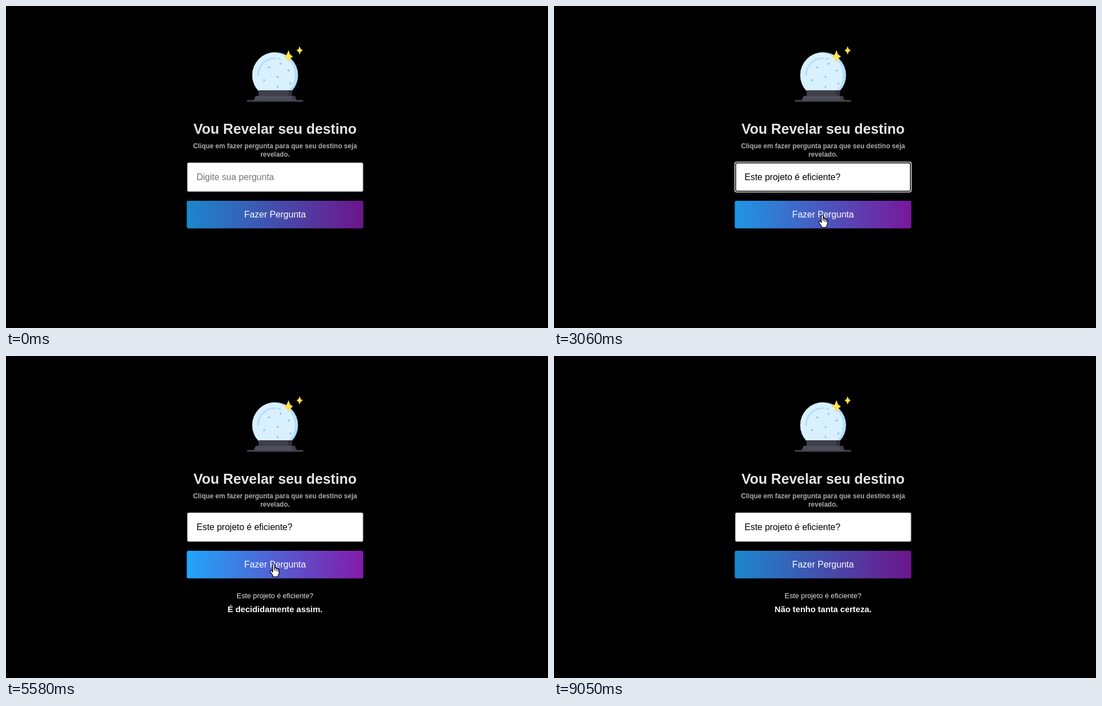
These frames come from a looping animation (970x577 px, 9.98 s). An HTML page with a canvas:

```html
<!DOCTYPE html>
<html lang="pt">
<head>
<meta charset="utf-8">
<title>Vou Revelar seu destino</title>
<style>
html, body { margin: 0; width: 100%; height: 100%; overflow: hidden; background: #000; }
canvas { display: block; }
</style>
</head>
<body>
<canvas id="stage" width="970" height="577"></canvas>
<script>
const ctx = document.getElementById('stage').getContext('2d', { alpha: false });
const LOOP = 9980;
const CENTER = 481.5;
const FONT = '"Liberation Sans", Arial, sans-serif';
const QUESTION = 'Este projeto é eficiente?';
const BUTTON = { x: 323.5, y: 349, w: 316, h: 49.5 };

// Pointer hot spot over time: [ms, x, y]
const PATH = [
  [190, 876, 510], [850, 446, 283], [1020, 445, 293], [1350, 445, 293],
  [1490, 445, 330], [1760, 445, 312], [2710, 445, 312], [3060, 480, 374],
  [3450, 480, 374], [3590, 461, 418], [3660, 472, 436], [3900, 492, 448],
  [4200, 522, 432], [4420, 516, 404], [4560, 492, 394], [4850, 479, 375],
  [5510, 479, 375], [5580, 479, 373], [6310, 479, 373], [6380, 478, 371],
  [7360, 478, 371], [7500, 478, 359], [7640, 478, 371], [8420, 478, 371],
  [8560, 540, 401], [8700, 707, 424], [9040, 882, 570]
];

function pointer(t) {
  if (t < PATH[0][0] || t > PATH[PATH.length - 1][0]) return null;
  const i = Math.max(1, PATH.findIndex(p => p[0] >= t));
  const [t0, x0, y0] = PATH[i - 1], [t1, x1, y1] = PATH[i];
  const k = (t - t0) / (t1 - t0);
  return { x: x0 + (x1 - x0) * k, y: y0 + (y1 - y0) * k };
}

const within = (p, x, y, w, h) => p && p.x >= x && p.x <= x + w && p.y >= y && p.y <= y + h;
const onButton = p => within(p, BUTTON.x, BUTTON.y, BUTTON.w, BUTTON.h);

// Share of the last 300 ms spent on the button, a linear hover transition
function hover(t) {
  let n = 0;
  for (let i = 0; i < 30; i++) if (onButton(pointer(t - i * 10))) n++;
  return n / 30;
}

// CSS "ease"
function ease(x) {
  if (x <= 0) return 0;
  if (x >= 1) return 1;
  let lo = 0, hi = 1, u = 0.5;
  for (let i = 0; i < 20; i++) {
    u = (lo + hi) / 2;
    const v = 1 - u;
    if (0.75 * v * v * u + 0.75 * v * u * u + u * u * u < x) lo = u; else hi = u;
  }
  return 0.3 * (1 - u) * (1 - u) * u + 3 * (1 - u) * u * u + u * u * u;
}

function text(str, x, y, font, color, align = 'center') {
  ctx.font = font + ' ' + FONT;
  ctx.fillStyle = color;
  ctx.textAlign = align;
  ctx.fillText(str, x, y);
}

function box(x, y, w, h, r, fill) {
  ctx.beginPath();
  ctx.roundRect(x, y, w, h, r);
  ctx.fillStyle = fill;
  ctx.fill();
}

function disc(x, y, r, fill) {
  ctx.beginPath();
  ctx.arc(x, y, r, 0, Math.PI * 2);
  ctx.fillStyle = fill;
  ctx.fill();
}

function poly(points, fill) {
  ctx.beginPath();
  points.forEach(([x, y]) => ctx.lineTo(x, y));
  ctx.closePath();
  ctx.fillStyle = fill;
  ctx.fill();
}

function sparkle(x, y, w, h) {
  const a = w * 0.35, b = h * 0.35;
  poly([[x, y - h], [x + a, y - b], [x + w, y], [x + a, y + b],
        [x, y + h], [x - a, y + b], [x - w, y], [x - a, y - b]], '#ffe14f');
}

function arc(from, to) {
  ctx.beginPath();
  ctx.arc(481.5, 124, 30.5, from * Math.PI, to * Math.PI);
  ctx.stroke();
}

function crystalBall() {
  ctx.save();
  ctx.beginPath();
  ctx.rect(430, 70, 110, 82);
  ctx.clip();
  disc(481.7, 124, 41, '#b3dfff');
  ctx.beginPath();
  ctx.arc(481.7, 124, 41, 0, Math.PI * 2);
  ctx.clip();
  disc(476, 124, 41, '#d9f0ff');
  ctx.restore();

  ctx.strokeStyle = '#b3dfff';
  ctx.lineWidth = 3;
  ctx.lineCap = 'round';
  arc(1, 1.5);
  arc(1.56, 1.6);
  [[471, 110], [491.5, 103.5], [506, 115.5], [486, 127], [462, 133], [509, 139], [486, 145]]
    .forEach(([x, y]) => disc(x, y, 1.8, '#82c7f2'));

  box(452, 151, 59.5, 11, 1, '#3e3f49');
  box(505, 151, 6.5, 11, 1, '#32333b');
  poly([[447, 161], [517, 161], [520, 169.5], [443, 169.5]], '#4e4f5a');
  poly([[511, 161], [517, 161], [520, 169.5], [513, 169.5]], '#3e3f49');
  box(431, 168.5, 101, 3, 1.5, '#454650');

  sparkle(505.5, 90.5, 8, 11.5);
  sparkle(525.5, 79.5, 5.5, 7.5);
}

function field(t) {
  const focused = t >= 1020 && t < 3200;
  const typed = t >= 2110;
  if (focused) {
    box(323, 279, 317, 55, 4, '#fff');
    box(324.3, 280.3, 314.4, 52.4, 3, '#101010');
    box(326, 282, 311, 49, 1.5, '#fff');
  } else {
    box(324, 280.5, 315.5, 52.5, 3, '#858585');
    box(325, 281, 313.5, 51, 2.5, '#fff');
  }
  text(typed ? QUESTION : 'Digite sua pergunta', 341, 312, '16px', typed ? '#000' : '#757575', 'left');
  if (focused && (t < 1520 || (typed && t < 2710))) {
    ctx.fillStyle = '#000';
    ctx.fillRect(typed ? 510 : 341, 298, 1, 17);
  }
}

function button(t) {
  const { x, y, w, h } = BUTTON;
  const fill = ctx.createLinearGradient(x, 0, x + w, 0);
  fill.addColorStop(0, '#21a5fa');
  fill.addColorStop(1, '#841aaa');
  ctx.globalAlpha = 0.82 + 0.18 * hover(t);
  box(x, y, w, h, 3, fill);
  ctx.globalAlpha = 1;
  text('Fazer Pergunta', CENTER, 378.5, '16px', '#fff');
}

function answer(t) {
  if (t < 3260) return;
  const second = t >= 7300;
  ctx.globalAlpha = second ? ease((t - 7300) / 1000) : 1 - ease((t - 6260) / 900);
  text(QUESTION, CENTER, 434, '12.8px', '#e4e4e4');
  text(second ? 'Não tenho tanta certeza.' : 'É decididamente assim.', CENTER, 458.5, 'bold 15px', '#fff');
  ctx.globalAlpha = 1;
}

const ARROW = new Path2D('M0 0V16.5L3.8 13L6.3 18.8L9 17.7L6.5 12H11.8Z');
const HAND = new Path2D('M-1.5 1.5Q0 -1 1.7 1.5V7Q4 5.5 4.8 7.6Q7 6.6 7.7 8.8Q9.8 8.2 9.8 11V16L8 20V22.5H-1.5V20L-6 13.8Q-7 11.3 -4.6 11.3L-1.5 14Z');

function shape(path, p) {
  ctx.save();
  ctx.translate(p.x, p.y);
  ctx.fillStyle = '#fff';
  ctx.strokeStyle = '#000';
  ctx.lineWidth = 1.2;
  ctx.lineJoin = 'round';
  ctx.fill(path);
  ctx.stroke(path);
  if (path === HAND) {
    ctx.beginPath();
    [[1.7, 7], [4.8, 8], [7.7, 9]].forEach(([x, y]) => {
      ctx.moveTo(x, y);
      ctx.lineTo(x, y + 4);
    });
    ctx.stroke();
  }
  ctx.restore();
}

function beam(p) {
  const x = Math.round(p.x), y = Math.round(p.y);
  ctx.save();
  ctx.globalCompositeOperation = 'difference';
  ctx.fillStyle = '#fff';
  ctx.fillRect(x, y - 7, 1, 14);
  for (const edge of [y - 8, y + 7]) {
    ctx.fillRect(x - 3, edge, 3, 1);
    ctx.fillRect(x + 1, edge, 3, 1);
  }
  ctx.restore();
}

function cursor(t) {
  const p = pointer(t);
  if (!p) return;
  const overText = within(p, 324, 281, 315, 52) || within(p, 336, 242, 291, 31) ||
    (t >= 3260 && (within(p, 414, 422, 136, 18) || within(p, 398, 444, 167, 18)));
  if (onButton(p)) shape(HAND, p);
  else if (overText) beam(p);
  else shape(ARROW, p);
}

function draw(t) {
  ctx.fillStyle = '#000';
  ctx.fillRect(0, 0, 970, 577);
  crystalBall();
  text('Vou Revelar seu destino', CENTER, 229, 'bold 25.3px', '#e6e6e6');
  text('Clique em fazer pergunta para que seu destino seja', CENTER, 255, 'bold 12px', '#ababab');
  text('revelado.', CENTER, 269.5, 'bold 12px', '#ababab');
  field(t);
  button(t);
  answer(t);
  cursor(t);
}

const start = performance.now();
function tick() {
  draw((performance.now() - start) % LOOP);
  requestAnimationFrame(tick);
}
tick();
</script>
</body>
</html>
```
